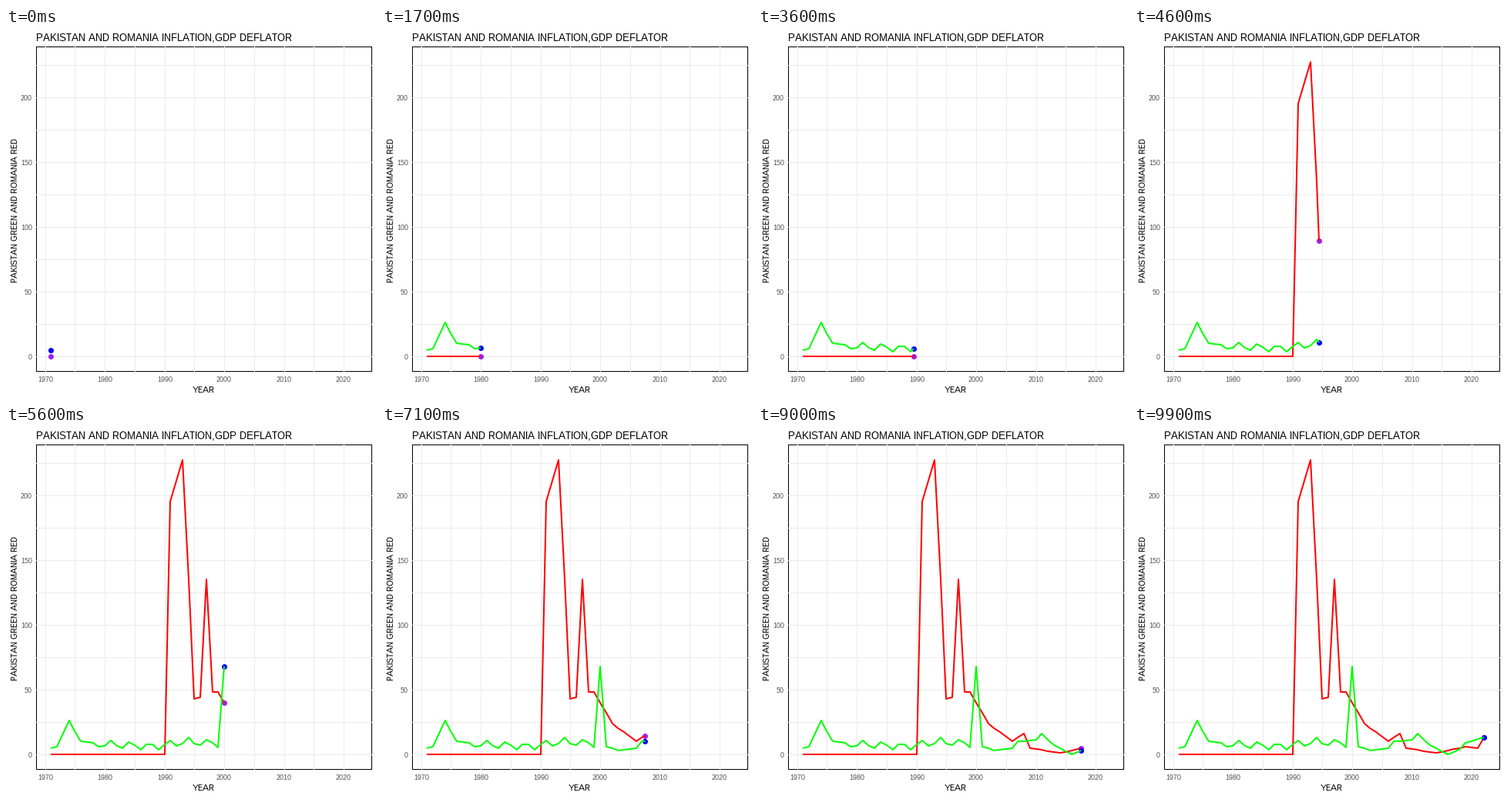
Recreate the animation shown at these times as a matplotlib script. Size 480 by 480 pixels, loop 10 s.

```python
import numpy as np
import matplotlib.pyplot as plt
from matplotlib.animation import FuncAnimation
from matplotlib.patches import Circle, Rectangle

SIZE, DPI, FRAMES = 480, 100, 100
PT = 72 / DPI  # points per pixel
GRID, TICK = "#ebebeb", "#4d4d4d"

plt.rcParams.update({
    "font.family": "Liberation Sans",
    "path.snap": False,
    "text.hinting": "native",
    "text.hinting_factor": 1,
})

years = np.arange(1971, 2023)
# Each year lands on a whole frame; frames between are interpolated.
knots = np.round((years - 1971) * (FRAMES - 1) / 51)


def trend(*points):
    return np.interp(years, *zip(*points))


# A steady ripple rides on the trend through the 80s and 90s
ripple = 3 * np.cos(2 * np.pi * (years - 1981) / 3.25)
ripple[(years < 1979) | (years > 1999)] = 0
pakistan = ripple + trend(
    (1971, 5), (1972, 6), (1974, 26), (1976, 10), (1979, 8), (1988, 6),
    (1994, 10), (1999, 8), (2000, 68), (2001, 6), (2003, 3), (2006, 5),
    (2007, 10), (2010, 11), (2011, 16), (2013, 7), (2016, 0), (2018, 4),
    (2019, 9), (2022, 13))
romania = trend(
    (1990, 0), (1991, 195), (1993, 227), (1995, 43), (1996, 44), (1997, 135),
    (1998, 48), (1999, 48), (2002, 24), (2006, 10), (2008, 16), (2009, 5),
    (2014, 1), (2019, 6), (2021, 5), (2022, 13))


# Whole-pixel coordinates
def px(year):
    return np.floor(51 + (np.asarray(year) - 1970) * 7.754)


def py(value):
    return np.floor(426.5 - np.asarray(value) * 1.682)


fig = plt.figure(figsize=(SIZE / DPI, SIZE / DPI), dpi=DPI, facecolor="white")
ax = fig.add_axes([0, 0, 1, 1])
ax.set(xlim=(0, SIZE), ylim=(SIZE, 0))
ax.axis("off")


def label(x, y, s, size, color="black", **kw):
    ax.text(x, y, s, fontsize=size * PT, color=color, va="baseline", **kw)


def grid_line(xs, ys):
    ax.plot(xs, ys, color=GRID, lw=PT, zorder=1, solid_capstyle="butt")


# Panel border sits beneath the grid
ax.add_patch(Rectangle((39.5, 24.5), 435, 421, fill=False, ec="black",
                       lw=PT, zorder=0))
for year in range(1970, 2021, 5):
    x = px(year)
    grid_line([x + 0.5] * 2, [24, 446])
    if year % 10 == 0:
        label(x, 459, str(year), 9, TICK, ha="center")
for value in range(0, 226, 25):
    y = py(value)
    grid_line([39, 475], [y + 0.5] * 2)
    if value % 50 == 0:
        label(34, y + 4, str(value), 9, TICK, ha="right")

label(39, 17, "PAKISTAN AND ROMANIA INFLATION,GDP DEFLATOR", 13)
label(256, 473, "YEAR", 11, ha="center")
label(15, 236, "PAKISTAN GREEN AND ROMANIA RED", 11, ha="center",
      rotation=90, rotation_mode="anchor")


def series(values, line_color, dot_color, z):
    dot = ax.add_patch(Circle((0, 0), 3.5, color=dot_color, lw=0, zorder=z))
    line, = ax.plot([], [], color=line_color, lw=2 * PT, zorder=z + 1,
                    solid_capstyle="butt", solid_joinstyle="round")
    return values, line, dot


tracks = [series(romania, "#ff0000", "#a020f0", 3),
          series(pakistan, "#00ff00", "#0000ff", 5)]


def update(i):
    now = np.interp(i, knots, years)
    past = years < now
    artists = []
    for values, line, dot in tracks:
        head = np.interp(i, knots, values)
        line.set_data(px(np.append(years[past], now)),
                      py(np.append(values[past], head)))
        dot.set_center((px(now) + 0.5, py(head) + 0.5))
        artists += [line, dot]
    return artists


anim = FuncAnimation(fig, update, frames=FRAMES, interval=100, repeat=True,
                     repeat_delay=0)
plt.show()
```
